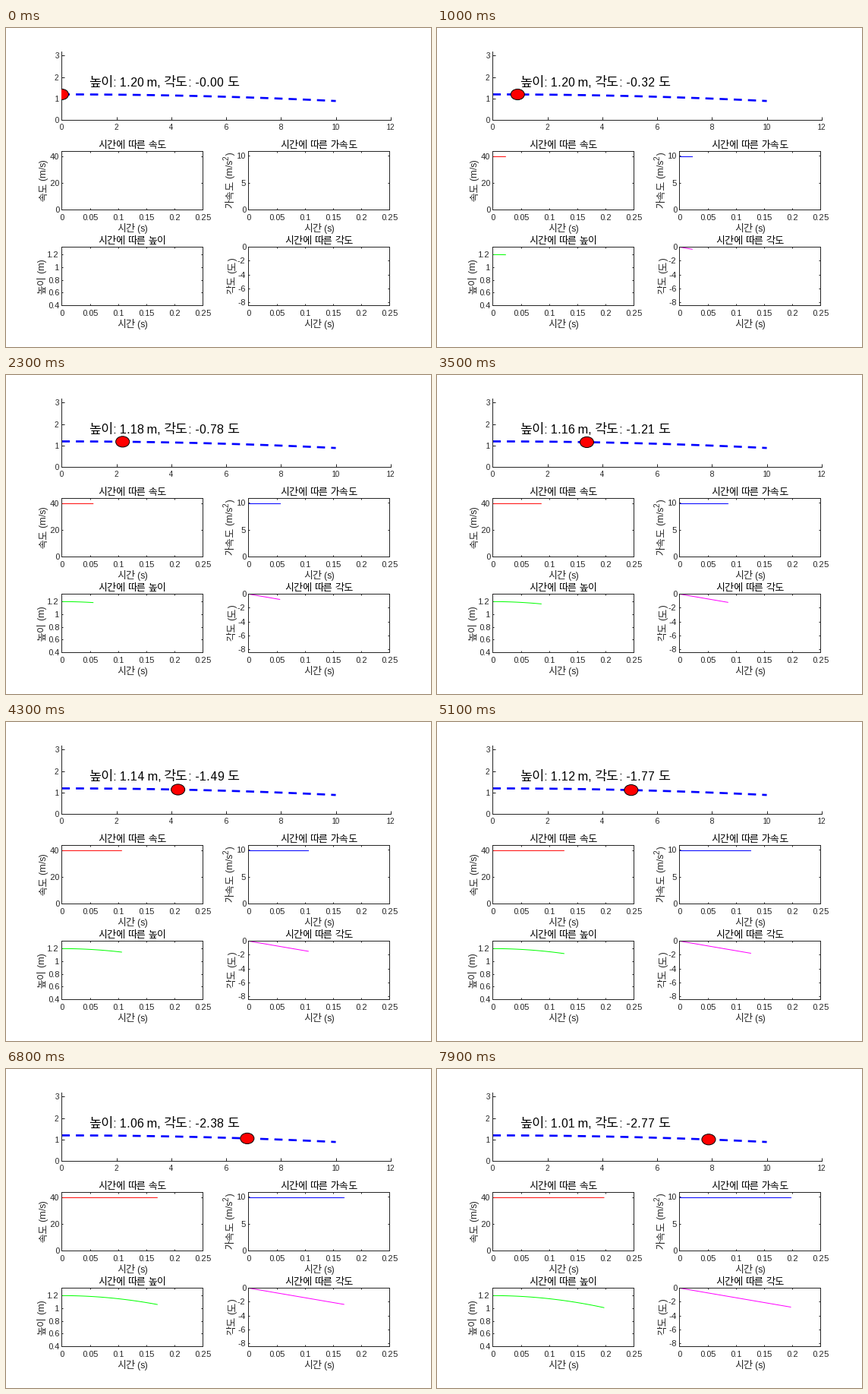
Animation, 560 px wide and 420 px high, one loop 8 s. Source, as a matplotlib script:

```python
from itertools import groupby

import matplotlib.pyplot as plt
import numpy as np
from matplotlib.animation import FuncAnimation
from matplotlib.patches import Ellipse

WIDTH, HEIGHT = 560, 420
FRAMES, INTERVAL = 80, 100
INK = "#262626"

plt.rcParams.update({
    "font.family": "Liberation Sans",
    "text.hinting_factor": 1,  # whole-pixel letter advances
    "axes.unicode_minus": False,
    "axes.linewidth": 1,
    "axes.edgecolor": INK,
})

# Throw over 10 m at 40 m/s from a height of 1.2 m
SPEED, GRAVITY, START_HEIGHT, DISTANCE = 40, 9.81, 1.2, 10
times = np.linspace(0, DISTANCE / SPEED, 100)
xs = SPEED * times
heights = START_HEIGHT - GRAVITY * times**2 / 2
speeds = np.hypot(SPEED, GRAVITY * times)
accelerations = np.full_like(times, GRAVITY)
angles = -np.degrees(np.arctan(GRAVITY * times / SPEED))

# At 72 dpi one point is one pixel
fig = plt.figure(figsize=(WIDTH / 72, HEIGHT / 72), dpi=72, facecolor="white")
renderer = fig.canvas.get_renderer()


def char_kind(char):
    if char == "²":
        return "super"
    return "hangul" if char >= "가" else "latin"


def mixed_text(x, y, string, size, color=INK, vertical=False, centered=True):
    """Set Hangul, Latin and superscript runs one after another on a baseline."""
    runs = []
    for kind, chars in groupby(string, char_kind):
        scale = {"hangul": 1.087, "latin": 1, "super": 0.8}[kind]
        piece = fig.text(
            0, 0, "".join(chars).replace("²", "2"),
            family="Noto Sans CJK JP" if kind == "hangul" else "Liberation Sans",
            size=size * scale, color=color, rotation=90 if vertical else 0,
            rotation_mode="anchor", ha="left", va="baseline")
        width = renderer.get_text_width_height_descent(
            piece.get_text(), piece.get_fontproperties(), False)[0]
        runs.append((piece, width, 0.48 * size if kind == "super" else 0))
    pen = -sum(width for _, width, _ in runs) / 2 if centered else 0
    for piece, width, lift in runs:
        dx, dy = (-lift, -pen) if vertical else (pen, -lift)
        piece.set_position(((x + dx) / WIDTH, 1 - (y + dy) / HEIGHT))
        pen += width
    return [piece for piece, _, _ in runs]


def add_axes(left, top, right, bottom, xlim, ylim, xticks, yticks):
    ax = fig.add_axes([left / WIDTH, 1 - bottom / HEIGHT,
                       (right - left) / WIDTH, (bottom - top) / HEIGHT])
    ax.set(xlim=xlim, ylim=ylim, xticks=xticks, yticks=yticks)
    for axis in (ax.xaxis, ax.yaxis):
        axis.set_major_formatter("{x:g}")
    ax.tick_params(direction="in", width=1, color=INK, labelcolor=INK)
    return ax


def add_chart(left, top, name, unit, values, color, ylim, yticks, label_x):
    right, bottom = left + 186, top + 77
    ax = add_axes(left, top, right, bottom, (0, 0.25), ylim,
                  np.arange(6) * 0.05, yticks)
    ax.tick_params(length=2, labelsize=11, top=True, right=True)
    ax.tick_params(axis="x", pad=5.5)
    ax.tick_params(axis="y", pad=3.5)
    middle = (left + right) / 2
    mixed_text(middle, top - 4.5, f"시간에 따른 {name}", 12, "black")
    mixed_text(middle, bottom + 28.2, "시간 (s)", 12)
    mixed_text(label_x, (top + bottom) / 2, f"{name} ({unit})", 12,
               vertical=True)
    line, = ax.plot([], [], color=color, lw=1)
    return line, values


scene = add_axes(73.4, 30.8, 506.8, 121.4, (0, 12), (0, 3.2),
                 range(0, 13, 2), range(4))
scene.spines[["top", "right"]].set_visible(False)
scene.tick_params(length=4, labelsize=10)
scene.tick_params(axis="x", pad=5)
scene.tick_params(axis="y", pad=3.5)
scene.plot(xs, heights, color="blue", lw=2.67, dashes=(4, 3),
           dash_capstyle="butt")
ball = Ellipse((0, START_HEIGHT), 0.5, 0.5, fc="red", ec="black", lw=1, zorder=3)
scene.add_patch(ball)
readout = mixed_text(109, 77.3, "높이: 1.20 m, 각도: -0.00 도", 16, "black",
                     centered=False)

LEFT, RIGHT, UPPER, LOWER = 73.4, 319.4, 162.4, 288.4
charts = [
    add_chart(LEFT, UPPER, "속도", "m/s", speeds, "red",
              (0, SPEED * 1.1), (0, 20, 40), 53.5),
    add_chart(RIGHT, UPPER, "가속도", "m/s²", accelerations, "blue",
              (0, GRAVITY * 1.1), (0, 5, 10), 299.5),
    add_chart(LEFT, LOWER, "높이", "m", heights, "lime",
              (heights[-1] - 0.5, START_HEIGHT * 1.1),
              (0.4, 0.6, 0.8, 1, 1.2), 51.5),
    add_chart(RIGHT, LOWER, "각도", "도", angles, "magenta",
              (angles[-1] - 5, 0), (-8, -6, -4, -2, 0), 302),
]


def update(frame):
    step = frame - (frame >= 7)  # the motion pauses once, for one frame
    ball.center = xs[step], heights[step]
    readout[1].set_text(f": {heights[step]:.2f} m, ")
    readout[3].set_text(f": {angles[step]:.2f} ")
    for line, values in charts:
        line.set_data(times[:step + 1], values[:step + 1])
    return []


animation = FuncAnimation(fig, update, frames=FRAMES, interval=INTERVAL,
                          init_func=lambda: update(0), repeat=True,
                          repeat_delay=0)
plt.show()
```
